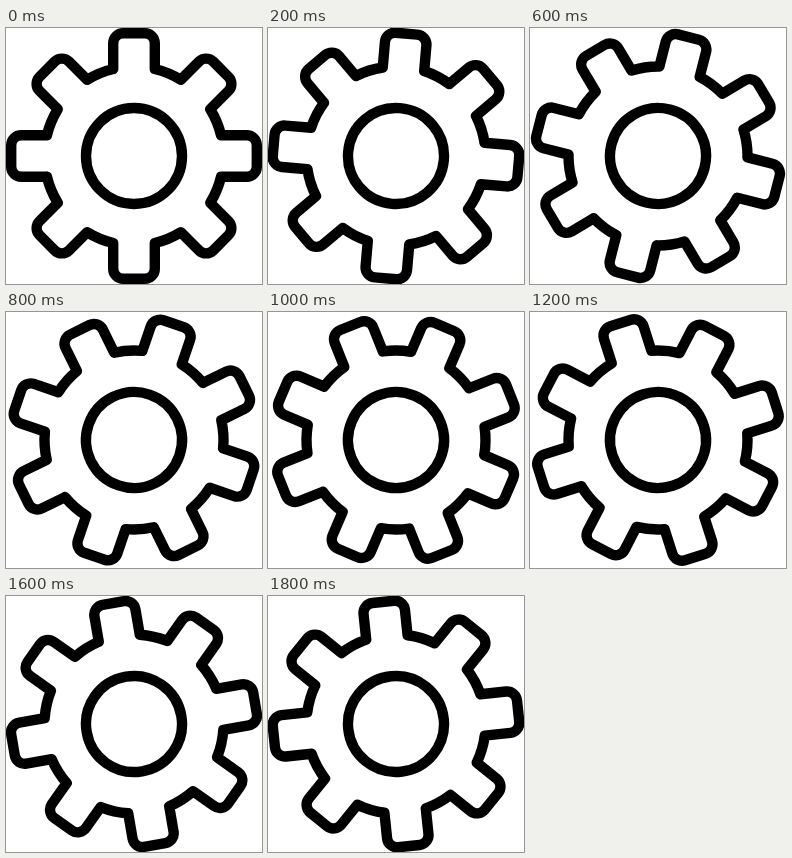
These frames come from a looping animation (256x256 px, 2 s). An HTML page with a canvas:

```html
<!DOCTYPE html>
<html lang="en">
<head>
<meta charset="utf-8">
<title>Turning gear</title>
<style>
  html, body { margin: 0; width: 100%; height: 100%; overflow: hidden; background: #fff; }
  canvas { display: block; width: 256px; height: 256px; }
</style>
</head>
<body>
<canvas id="stage" width="256" height="256"></canvas>
<script>
const ctx = document.getElementById('stage').getContext('2d');

const SIZE = 256;
const TEETH = 8;
const PITCH = 2 * Math.PI / TEETH;
const LOOP = 2000;
const STEP_TIME = 200;

const STROKE = 10.4;
const HOLE = 48;
const BODY = 89.5;
const TIP = 122.8;
const HALF_TOOTH = 20.8;
const CORNER = 10;

function gearPath() {
  const path = new Path2D();
  const rootAngle = Math.asin(HALF_TOOTH / BODY);
  const rootY = -BODY * Math.cos(rootAngle);

  for (let i = 0; i < TEETH; i++) {
    const tooth = new Path2D();
    tooth.moveTo(-HALF_TOOTH, rootY);
    tooth.arcTo(-HALF_TOOTH, -TIP, 0, -TIP, CORNER);
    tooth.arcTo(HALF_TOOTH, -TIP, HALF_TOOTH, rootY, CORNER);
    tooth.lineTo(HALF_TOOTH, rootY);
    tooth.arc(0, 0, BODY, rootAngle - Math.PI / 2, PITCH - rootAngle - Math.PI / 2);
    path.addPath(tooth, new DOMMatrix().rotate(i * 360 / TEETH));
  }
  path.moveTo(HOLE, 0);
  path.arc(0, 0, HOLE, 0, 2 * Math.PI);
  return path;
}

const gear = gearPath();

// Starts at five degrees per step and slows slightly through the loop.
function turn(step) {
  return (5 * step - 0.074 * step * step) * Math.PI / 180;
}

function draw(time) {
  const step = Math.floor((time % LOOP) / STEP_TIME);
  ctx.fillStyle = '#fff';
  ctx.fillRect(0, 0, SIZE, SIZE);
  ctx.save();
  ctx.translate(SIZE / 2, SIZE / 2);
  ctx.rotate(turn(step));
  ctx.strokeStyle = '#000';
  ctx.lineWidth = STROKE;
  ctx.lineJoin = ctx.lineCap = 'round';
  ctx.stroke(gear);
  ctx.restore();
}

let start;
function tick(now) {
  start ??= now;
  draw(now - start);
  requestAnimationFrame(tick);
}
draw(0);
requestAnimationFrame(tick);
</script>
</body>
</html>
```
